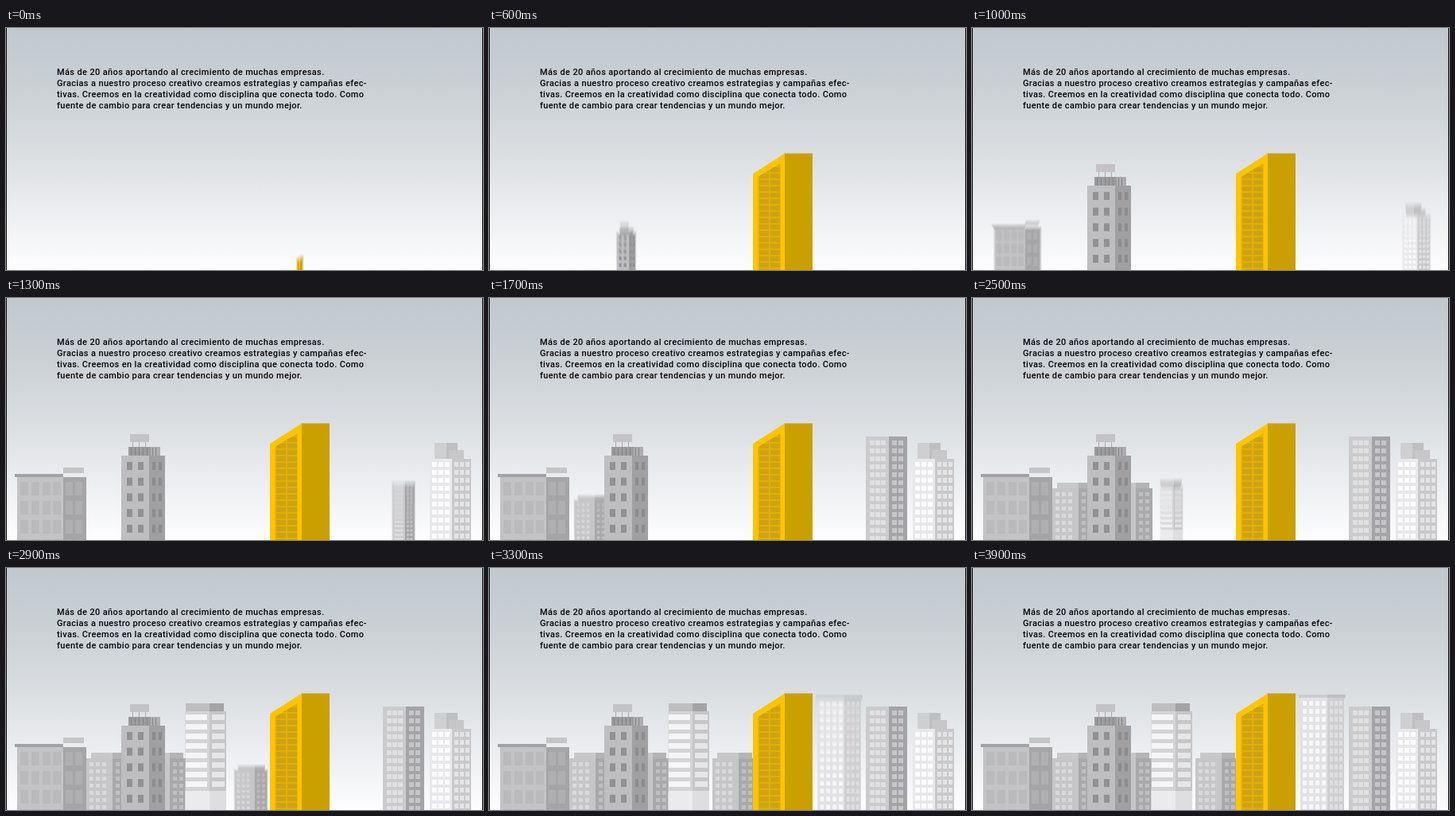
These frames come from a looping animation (600x304 px, 4300 ms). An HTML page with a canvas:

```html
<!DOCTYPE html>
<html lang="es">
<head>
<meta charset="utf-8">
<style>
  html, body { margin: 0; width: 100%; height: 100%; overflow: hidden; background: #fff; }
  canvas { position: absolute; left: 0; top: 0; }
  p {
    position: absolute; left: 64px; top: 49px; margin: 0; white-space: pre;
    font: 500 11px/14px Roboto, sans-serif; letter-spacing: .36px; color: #050505;
  }
</style>
</head>
<body>
<canvas id="stage" width="600" height="304"></canvas>
<p>Más de 20 años aportando al crecimiento de muchas empresas.
Gracias a nuestro proceso creativo creamos estrategias y campañas efec-
tivas. Creemos en la creatividad como disciplina que conecta todo. Como
fuente de cambio para crear tendencias y un mundo mejor.</p>
<script>
const W = 600, H = 304, LOOP = 4300, STEP = 100, GROW = 300;
const SHUTTER = 24, SAMPLES = 8;
const stage = document.getElementById('stage').getContext('2d');
const layer = document.createElement('canvas');
layer.width = W;
layer.height = H;
const ctx = layer.getContext('2d');

const sky = ctx.createLinearGradient(0, 0, 0, H);
[[0, '#c1c9ce'], [.25, '#cad0d4'], [.5, '#d9dde0'], [.75, '#ecedf0'], [1, '#fdfdfe']]
  .forEach(([at, color]) => sky.addColorStop(at, color));

function box(x1, y1, x2, y2, color) {
  ctx.fillStyle = color;
  ctx.fillRect(x1, y1, x2 - x1, y2 - y1);
}

function shape(points, color) {
  ctx.beginPath();
  points.forEach(([x, y]) => ctx.lineTo(x, y));
  ctx.closePath();
  ctx.fillStyle = color;
  ctx.fill();
}

// Window columns repeated downwards to the ground.
function windows(columns, width, top, height, pitch, color) {
  for (let y = top; y < H; y += pitch)
    for (const x of columns) box(x, y, x + width, Math.min(y + height, H), color);
}

function apartments(c) {
  box(c - 21, 232, c + 6, 240, '#c8c8cb');
  box(c + 6, 232, c + 23, 240, '#b4b4b7');
  box(c - 27, 239, c + 6, H, '#c6c6c9');
  box(c + 6, 239, c + 27, H, '#a9a9ac');
  windows([c - 23, c - 15, c - 7], 5, 244, 5, 9, '#d9d9dc');
  windows([c + 10, c + 18], 5, 244, 5, 9, '#bfbfc2');
}

function warehouse() {
  box(72, 213, 98, 220, '#c5c5c8');
  box(14, 225, 72, H, '#c3c3c6');
  box(72, 225, 101, H, '#a5a5a8');
  box(11, 221, 72, 225, '#a3a3a6');
  windows([18, 32, 46, 59], 10, 231, 17, 24, '#bababd');
  windows([75, 87], 9, 231, 17, 24, '#afafb2');
}

function hotel() {
  box(156, 171, 180, 181, '#c3c3c6');
  windows([159, 167, 175], 1, 181, 6, H, '#aaaaad');
  box(154, 187, 182, 198, '#9c9c9f');
  box(182, 187, 194, 198, '#aeaeb1');
  windows([157, 162, 167, 172, 177, 184, 188], 1, 188, 10, H, '#858589');
  box(145, 198, 180, H, '#bebec1');
  box(180, 198, 200, H, '#a0a0a3');
  windows([152, 166], 7, 206, 10, 19.7, '#919195');
  windows([184, 192], 4, 206, 10, 19.7, '#8c8c90');
}

function whiteTower() {
  box(226, 170, 256, 180, '#bebec1');
  box(256, 170, 274, 180, '#a3a3a6');
  box(225.5, 180, 256, H, '#d4d4d7');
  box(256, 180, 277, H, '#c6c6c9');
  windows([226], 27, 184, 7, 12, '#f5f5f7');
  windows([259], 16, 184, 7, 12, '#e6e6e9');
  box(225.5, 280, 256, H, '#ebebee');
  box(256, 280, 277, H, '#dedee1');
}

function slab() {
  box(411, 159, 447, 163, '#cdcdd0');
  box(447, 159, 470, 163, '#c0c0c3');
  box(413, 163, 447, H, '#e2e1e4');
  box(447, 163, 468, H, '#cfcfd2');
  windows([416, 424, 432, 440], 5, 167, 6, 10, '#f7f7f9');
  windows([450, 456, 462], 4, 167, 6, 10, '#dfdfe2');
}

function office() {
  box(474, 174, 503, H, '#cbcbce');
  box(503, 174, 526, H, '#a4a3a7');
  windows([479, 486, 493], 6, 179, 6, 10, '#e0e0e3');
  windows([507, 515], 6, 179, 6, 10, '#c6c6c9');
}

function stepped() {
  box(539, 182, 554, 202, '#cfcfd2');
  box(554, 182, 568, 202, '#bfbfc2');
  box(557, 191, 576, 202, '#c7c7ca');
  box(533, 202, 561, H, '#e8e8eb');
  box(561, 202, 585, H, '#c9c9cc');
  windows([536, 544, 552], 6, 206, 6, 10, '#fbfbfc');
  windows([564, 571, 578], 5, 206, 6, 10, '#e4e4e7');
}

function goldTower() {
  box(371.5, 157.5, 407, H, '#caa000');
  shape([[332, 183], [372, 157.5], [372, H], [332, H]], '#fdc500');
  shape([[338.5, 187], [366.5, 170], [366.5, H], [338.5, H]], '#e3b000');
  ctx.save();
  ctx.clip();
  windows([340, 354], 12, 175, 6, 8, '#cda315');
  ctx.restore();
}

// Back to front; each building grows from its ground point at x.
const buildings = [
  { x: 128, start: 1470, draw: () => apartments(128) },
  { x: 200, start: 2003, draw: () => apartments(200) },
  { x: 308, start: 2670, draw: () => apartments(308) },
  { x: 56.5, start: 800, draw: warehouse },
  { x: 172.5, start: 470, draw: hotel },
  { x: 250.5, start: 2337, draw: whiteTower },
  { x: 440.5, start: 3003, draw: slab },
  { x: 500, start: 1137, draw: office },
  { x: 559, start: 800, draw: stepped },
  { x: 369.5, start: -30, draw: goldTower }
];

function drawScene(time) {
  box(0, 0, W, H, sky);
  for (const { x, start, draw } of buildings) {
    const scale = Math.min(1, (time - start) / GROW);
    if (scale <= 0) continue;
    ctx.save();
    ctx.translate(x, H);
    ctx.scale(scale, scale);
    ctx.translate(-x, -H);
    draw();
    ctx.restore();
  }
  box(0, 0, 1, H, '#0c0c0c');
  box(W - 1, 0, W, H, '#0c0c0c');
}

let shown = -1;
function play(now) {
  const time = Math.floor((now % LOOP) / STEP) * STEP;
  if (time !== shown) {
    shown = time;
    // Average several moments for motion blur.
    for (let i = 0; i < SAMPLES; i++) {
      drawScene(time + SHUTTER * ((i + .5) / SAMPLES - .5));
      stage.globalAlpha = 1 / (i + 1);
      stage.drawImage(layer, 0, 0);
    }
  }
  requestAnimationFrame(play);
}
play(0);
</script>
</body>
</html>
```
